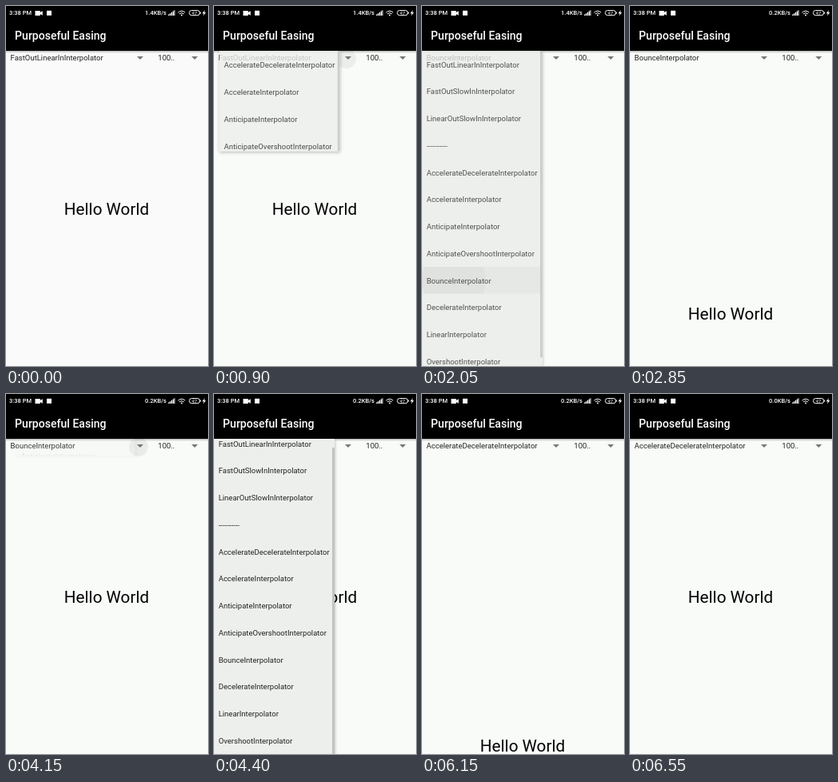
Animation, 253 px wide and 450 px high, one loop 7600 ms. Source, as an HTML page:

```html
<!DOCTYPE html>
<html lang="en">
<head>
<meta charset="utf-8">
<title>Interpolators</title>
<style>
  html, body { margin: 0; width: 100%; height: 100%; overflow: hidden; background: #fafafa; }
  svg { display: block; width: 100vw; height: 100vh; font-family: Roboto, sans-serif; }
  .label { font-size: 9.5px; fill: #222; }
  .status { font-size: 7.5px; font-weight: 500; fill: #fff; }
</style>
</head>
<body>
<svg viewBox="0 0 253 450">
  <defs>
    <linearGradient id="barShade" x2="0" y2="1">
      <stop offset="0" stop-opacity=".28"/>
      <stop offset="1" stop-opacity="0"/>
    </linearGradient>
    <filter id="lift" x="-20%" y="-20%" width="140%" height="140%">
      <feDropShadow dx="0" dy="1.5" stdDeviation="2.2" flood-opacity=".32"/>
    </filter>
    <clipPath id="below"><rect y="56" width="253" height="394"/></clipPath>
    <clipPath id="reveal"><rect id="revealBox" y="56" width="151"/></clipPath>
    <clipPath id="rowClip"><rect id="rowBox" width="151" height="33.75"/></clipPath>
  </defs>

  <rect id="page" width="253" height="450"/>
  <rect id="haze" y="56" width="150" height="394" fill="#edefec"/>
  <rect y="56" width="253" height="3" fill="url(#barShade)"/>
  <text id="hello" x="126" y="261.4" font-size="20.7" text-anchor="middle">Hello World</text>

  <circle id="touch" cx="166" cy="66" r="12"/>
  <text id="choice" class="label" x="5.6" y="68.2"></text>
  <text class="label" x="190.3" y="68.2">100..</text>
  <path d="M164 63h8l-4 4zM232.3 63h8l-4 4z" fill="#757775"/>

  <g id="popup" clip-path="url(#below)">
    <rect id="panel" y="56" width="151" fill="#edefec" filter="url(#lift)"/>
    <g clip-path="url(#reveal)">
      <g id="content">
        <g id="list">
          <g id="press" clip-path="url(#rowClip)">
            <rect id="rowTint" width="151" height="33.75" fill-opacity=".045"/>
            <circle id="wave" cx="40" fill-opacity=".03"/>
          </g>
        </g>
        <rect id="thumb" x="148" width="3" height="383.3" fill="#c2c4c1"/>
      </g>
    </g>
  </g>

  <rect width="253" height="56"/>
  <text x="11.1" y="42" font-size="14.06" font-weight="500" fill="#fff">Purposeful Easing</text>

  <text class="status" x="4" y="11.2">3:38 PM</text>
  <path d="M36.5 6h6.3v2l3-1.8v5.6l-3-1.8v2h-6.3z" fill="#fff"/>
  <rect x="51" y="5.8" width="6" height="6" fill="#fff"/>
  <text id="speed" class="status" x="201" y="11.2" text-anchor="end"></text>
  <path d="M203 12v-1.6h1.3V12zM204.9 12V9.2h1.3V12zM206.8 12V7.8h1.3V12zM208.7 12V6.4h1.3V12zM210.4 12V5.2h1.1V12z" fill="#fff"/>
  <g fill="none" stroke="#fff">
    <path d="M215.6 8.2q4.4-4 8.8 0M217.1 9.9q2.9-2.6 5.8 0"/>
    <rect x="229.5" y="5.5" width="13.2" height="6.2" rx="3"/>
    <path d="M243.7 7.5v2.2"/>
  </g>
  <circle cx="220" cy="11.4" r="1" fill="#fff"/>
  <text x="236.1" y="10.7" font-size="5.8" fill="#fff" text-anchor="middle">47</text>
  <path d="M249 5l-3.2 4.2h2l-.8 3.3 3.3-4.4h-2z" fill="#fff"/>
</svg>
<script>
const LOOP = 7600, STEP = 50, TOP = 56, ROW = 33.75, HEIGHT = 394, SCREEN = 450;
const names = ['FastOutLinearIn', 'FastOutSlowIn', 'LinearOutSlowIn', '', 'AccelerateDecelerate',
  'Accelerate', 'Anticipate', 'AnticipateOvershoot', 'Bounce', 'Decelerate', 'Linear', 'Overshoot']
  .map(n => n ? n + 'Interpolator' : '----------');

const $ = id => document.getElementById(id);
const set = (id, attrs) => { for (const k in attrs) $(id).setAttribute(k, attrs[k]); };
const clamp = x => Math.min(1, Math.max(0, x));
const smooth = x => (x = clamp(x), x * x * (3 - 2 * x));

// cubic-bezier(.4, 0, .2, 1), solved by bisection
function fastOutSlowIn(x) {
  let lo = 0, hi = 1;
  for (let i = 0; i < 20; i++) {
    const s = (lo + hi) / 2, r = 1 - s;
    if (1.2 * r * r * s + 0.6 * r * s * s + s * s * s < x) lo = s; else hi = s;
  }
  return 3 * (1 - lo) * lo * lo + lo * lo * lo;
}

function bounce(x) {
  x *= 1.1226;
  const arc = (mid, base) => 8 * (x - mid) ** 2 + base;
  if (x < 0.3535) return arc(0, 0);
  if (x < 0.7408) return arc(0.54719, 0.7);
  if (x < 0.9644) return arc(0.8526, 0.9);
  return arc(1.0435, 0.95);
}

const accelDecel = x => 0.5 - 0.5 * Math.cos(Math.PI * x);

// Each round: the popup opens, a row is picked, then the greeting flies in with that easing
const rounds = [
  { touch: 800, open: 811, span: 330, pick: 1950, row: 8, scroll: 0,
    fly: 2436, flight: 800, ease: bounce },
  { touch: 4110, open: 4136, span: 260, pick: 5250, row: 4, scroll: names.length * ROW - HEIGHT,
    fly: 5650, flight: 900, ease: accelDecel }
];

names.forEach((name, i) => {
  const text = document.createElementNS('http://www.w3.org/2000/svg', 'text');
  text.textContent = name;
  text.setAttribute('class', 'label');
  text.setAttribute('x', 5.7);
  text.setAttribute('y', TOP + i * ROW + 20.6);
  $('list').append(text);
});

// Once a row is picked the greeting waits one screen below its resting place
function drop(t, { pick, fly, flight, ease }) {
  if (t <= pick || t >= fly + flight) return 0;
  return SCREEN * (1 - ease(clamp((t - fly) / flight)));
}

function drawPopup(t) {
  const p = rounds.find(q => t >= q.touch && t < q.pick + 300);
  const visible = p && t >= p.open;
  const gone = p ? t - p.pick : 0;
  $('popup').style.display = visible ? '' : 'none';
  set('touch', { 'fill-opacity': p ? 0.06 * (1 - smooth((t - p.open - 30) / 220)) : 0 });
  set('haze', { opacity: gone > 0 ? 0.7 * (1 - smooth((gone - 140) / 130)) : 0 });
  if (!visible) return;

  const age = t - p.open, x = clamp(age / p.span);
  const grow = fastOutSlowIn(x);
  const dx = 15 * (1 - x) ** 2.5, dy = -188 * (1 - grow);
  const box = { x: dx, height: 18 + (HEIGHT - 18) * grow };
  set('panel', box);
  set('revealBox', box);
  set('popup', { opacity: clamp(age / 110) * (1 - smooth((gone - 60) / 130)) });
  set('content', { transform: `translate(${dx} ${dy})` });
  set('list', { transform: `translate(0 ${-p.scroll})` });
  set('thumb', { y: TOP + p.scroll });

  const y = TOP + p.row * ROW;
  $('press').style.display = gone >= 0 ? '' : 'none';
  set('rowBox', { y });
  set('rowTint', { y });
  set('wave', { cy: y + ROW / 2, r: Math.max(0, 10 + gone * 0.3) });
}

function draw(t) {
  const row = rounds.reduce((last, r) => t > r.pick ? r.row : last, 0);
  const offset = rounds.reduce((sum, r) => sum + drop(t, r), 0);
  set('page', { fill: t < 500 ? '#fafafa' : '#f8fbf8' });
  set('hello', { transform: `translate(0 ${offset})` });
  $('choice').textContent = names[row];
  $('speed').textContent = (t < 2700 ? '1.4' : t < 6300 ? '0.2' : '0.0') + 'KB/s';
  drawPopup(t);
}

const begin = performance.now();
function tick() {
  const t = (performance.now() - begin) % LOOP;
  draw(Math.floor(t / STEP) * STEP);
  requestAnimationFrame(tick);
}
tick();
</script>
</body>
</html>
```
